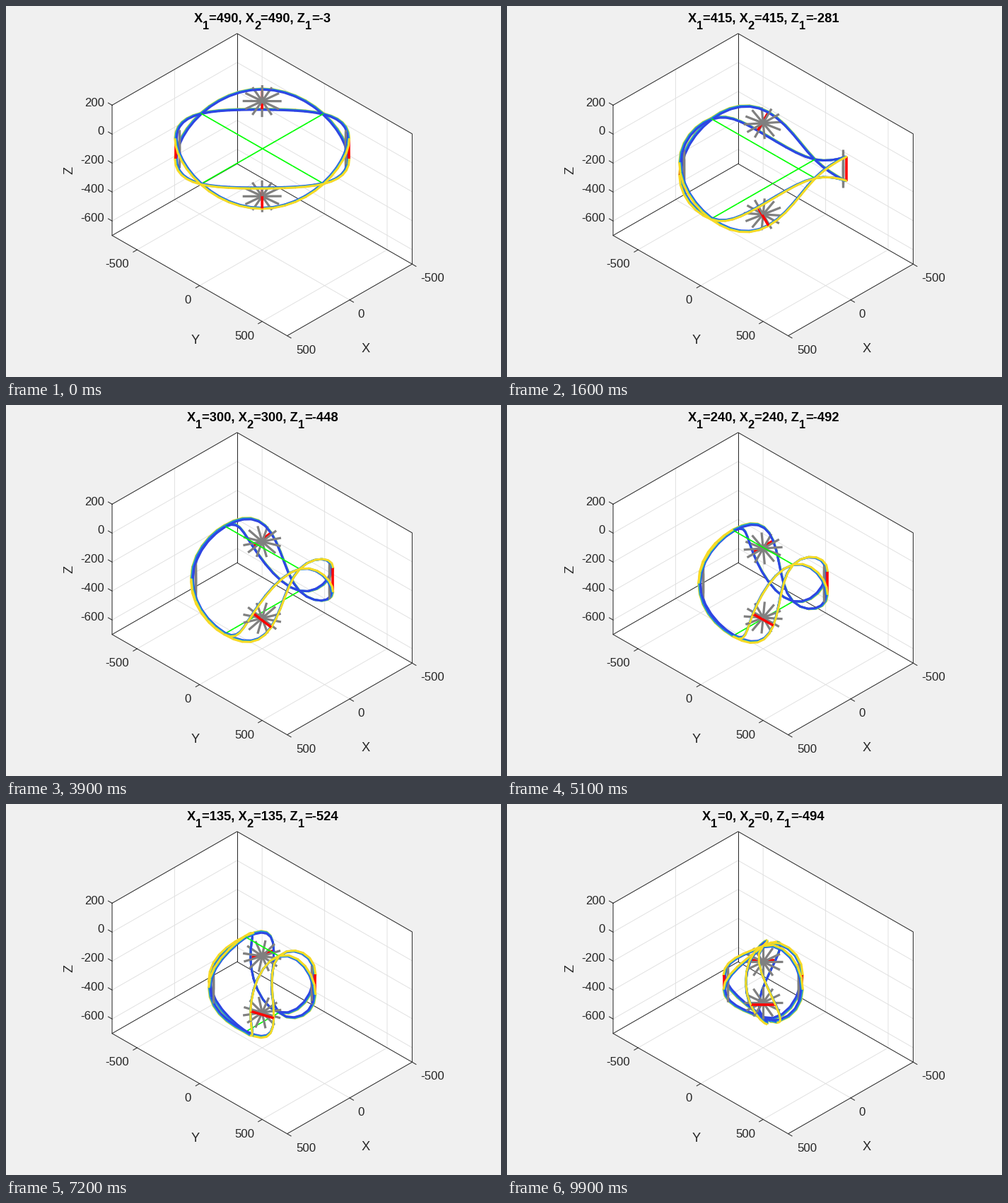
A matplotlib script that plays this animation: 700x525 px, repeating every 10 s.

```python
import numpy as np
import matplotlib.pyplot as plt
from matplotlib.animation import FuncAnimation
from matplotlib.collections import LineCollection

W, H, DPI = 700, 525, 100
FRAMES, INTERVAL = 100, 100
PX = 72 / DPI                      # points per pixel
INK, GRID = "#262626", "#dfdfdf"
LAYERS = [(-6, "#2f45e2"), (-2, "#1f96e6"), (1, "#2bb5a5"), (4, "#f9da25")]
GRAY, RED, GREEN = "#808080", "#ff0000", "#00ff00"
BAR, SPOKE, HUB_GAP = 70, 110, 20  # half bar, wheel radius, wheel to band
HALF = 490 * np.pi / 4             # band length from crossing to wheel
STEPS = 12

plt.rcParams["font.family"] = "Liberation Sans"
fig = plt.figure(figsize=(W / DPI, H / DPI), dpi=DPI, facecolor="#f0f0f0")
ax = fig.add_axes([0, 0, 1, 1])
ax.set_xlim(0, W)
ax.set_ylim(H, 0)
ax.axis("off")


def project(p):
    x, y, z = np.moveaxis(np.asarray(p, float), -1, 0)
    return np.stack([362.2 + 0.1768 * (y - x),
                     201.6 + 0.1014 * (x + y) - 0.2048 * z], axis=-1)


def depth(p):
    x, y, z = p
    return 0.579 * (x + y) + 0.574 * z


def line3(points, color, width, order):
    xy = project(points)
    ax.plot(xy[:, 0], xy[:, 1], color=color, lw=width * PX, zorder=order)


def label(x, y, s, size=16.7, **kw):
    ax.text(x, y + 0.7, s, fontsize=size * PX, color=INK,
            va="center_baseline", **{"ha": "center", **kw})


def tick(start, dx, dy):
    x, y = project(start)
    ax.plot([x, x + dx], [y, y + dy], color=INK, lw=PX, zorder=2)


def draw_box():
    x0, x1, y0, y1, z0, z1 = -500, 500, -700, 700, -700, 200
    hull = project([(x1, y0, z1), (x0, y0, z1), (x0, y1, z1),
                    (x0, y1, z0), (x1, y1, z0), (x1, y0, z0)])
    ax.fill(hull[:, 0], hull[:, 1], color="white", lw=0, zorder=0)
    for y in (-500, 0, 500):
        line3([(x1, y, z0), (x0, y, z0), (x0, y, z1)], GRID, 0.9, 1)
    line3([(0, y1, z0), (0, y0, z0), (0, y0, z1)], GRID, 0.9, 1)
    for z in (-600, -400, -200, 0):
        line3([(x1, y0, z), (x0, y0, z), (x0, y1, z)], GRID, 0.9, 1)
    line3([(x1, y0, z1), (x0, y0, z1), (x0, y1, z1), (x0, y1, z0),
           (x1, y1, z0), (x1, y0, z0), (x1, y0, z1)], INK, 1, 2)
    line3([(x1, y0, z0), (x0, y0, z0), (x0, y1, z0)], INK, 1, 2)
    line3([(x0, y0, z0), (x0, y0, z1)], INK, 1, 2)

    for i, z in enumerate((200, 0, -200, -400, -600)):
        tick((x1, y0, z), -5.5, -3.2)
        label(139, 135 + 40.8 * i, str(z), ha="right")
    for y, lx, ly in ((-500, 157, 363.5), (0, 257, 414.5), (500, 337, 465.5)):
        tick((x1, y, z0), -5.5, 3.2)
        label(lx, ly, str(y))
    for x, lx, ly in ((500, 424, 485), (0, 502.5, 434), (-500, 603, 383)):
        tick((x, y1, z0), 5.5, 3.2)
        label(lx, ly, str(x))
    label(509, 483, "X", 18.3)
    label(267.5, 471, "Y", 18.3)
    label(89.5, 233, "Z", 18.3, rotation=90)


# Title pieces alternate plain parts and lowered indices.
ADVANCE = {"X": 0.667, "Z": 0.611, "=": 0.584, "-": 0.333, ",": 0.278, " ": 0.278}
BIG, SMALL = 18.33, 16.5
title = [ax.text(0, 33 if i % 2 else 23, "", weight="bold", color="black",
                 fontsize=(SMALL if i % 2 else BIG) * PX) for i in range(7)]


def set_title(x, z):
    parts = ["X", "1", f"={x}, X", "2", f"={x}, Z", "1", f"={z}"]
    sizes = [SMALL if i % 2 else BIG for i in range(7)]
    widths = [s * sum(ADVANCE.get(ch, 0.556) for ch in p)
              for p, s in zip(parts, sizes)]
    left = 362.5 - sum(widths) / 2
    for t, p, w in zip(title, parts, widths):
        t.set_text(p)
        t.set_x(left)
        left += w


def shape(k):
    x = min(490, 495 - 5 * k)
    z = -np.sqrt(max(9, 244036 + 523 * x - 2.22 * x * x))
    hub = min(142 + 0.4 * x + 6e-5 * x * x, 332 + 0.5 * (490 - x))
    return x, z, hub


def quadrant(sx, sy, x, z, hub, add):
    p, q = np.array([0, sy * x, 0.0]), np.array([sx * x, 0, z])
    ex, ey = np.array([sx, 0.0, 0]), np.array([0, -sy, 0.0])
    mid, c = (p + q) / 2, np.linalg.norm(q - p) / 2
    u = (q - p) / (2 * c)
    n = np.array([sx, sy, 0]) / np.sqrt(2)
    b = np.cross(n, u)
    rise = (hub - x / 2) * np.sqrt(2)
    sag = rise + HUB_GAP

    # Centre line: leaves p along ex, reaches q along ey, crests at the wheel
    s = np.linspace(-1, 1, STEPS + 1)[:, None]
    ku = (HALF * (u @ ex) - c) / 2
    kn = HALF / np.sqrt(8) / sag - 1
    kb = HALF * (b @ ex) / 2
    arc = mid + ((c - ku) * s + ku * s**3) * u \
        + sag * (1 - s**2) * (1 + kn * s**2) * n + kb * (s**3 - s) * b
    slope = (c - ku + 3 * ku * s**2) * u \
        + 2 * sag * s * (kn - 1 - 2 * kn * s**2) * n + kb * (3 * s**2 - 1) * b

    # The width direction turns square to the crossing at either end
    end = np.where(s < 0, ex, ey)
    across = b - s**2 * (end @ b)[:, None] * end
    normal = np.cross(slope, across)
    normal /= np.linalg.norm(normal, axis=1, keepdims=True)
    normal *= np.sign(normal[STEPS // 2] @ n)
    side = BAR * np.cos(np.pi * s / 2) * across
    for sign in (-1, 1):
        for off, color in LAYERS:
            pts = arc + sign * side + off * normal
            for v, w in zip(pts[:-1], pts[1:]):
                ext = 0.03 * (w - v)
                add(v - ext, w + ext, color, 3)

    # Wheel and cross bar
    hub_pt = mid + rise * n
    for a in np.arange(12) * np.pi / 6:
        add(hub_pt, hub_pt + SPOKE * (np.cos(a) * b + np.sin(a) * u), GRAY, 3.2)
    top = mid + sag * n
    add(top - BAR * b, top + BAR * b, RED, 3.6, 14 * n)


def update(k):
    x, z, hub = shape(k)
    items = []

    def add(v, w, color, width, bias=0):
        items.append((depth((v + w) / 2 + bias), (v, w), color, width * PX))

    for sx in (-1, 1):
        for sy in (-1, 1):
            quadrant(sx, sy, x, z, hub, add)
    cuts = np.linspace(-x, x, 9)
    for v, w in zip(cuts[:-1], cuts[1:]):
        add(np.array([0, v, 0]), np.array([0, w, 0]), GREEN, 1.7)
        add(np.array([v, 0, z]), np.array([w, 0, z]), GREEN, 1.7)

    items.sort(key=lambda it: it[0])
    lines.set_segments(project([it[1] for it in items]))
    lines.set_color([it[2] for it in items])
    lines.set_linewidth([it[3] for it in items])
    set_title(x, int(round(z)))
    return [lines, *title]


draw_box()
lines = LineCollection([], capstyle="butt", zorder=5)
ax.add_collection(lines, autolim=False)

anim = FuncAnimation(fig, update, frames=FRAMES, interval=INTERVAL,
                     repeat=True, repeat_delay=0, blit=False)
plt.show()
```
